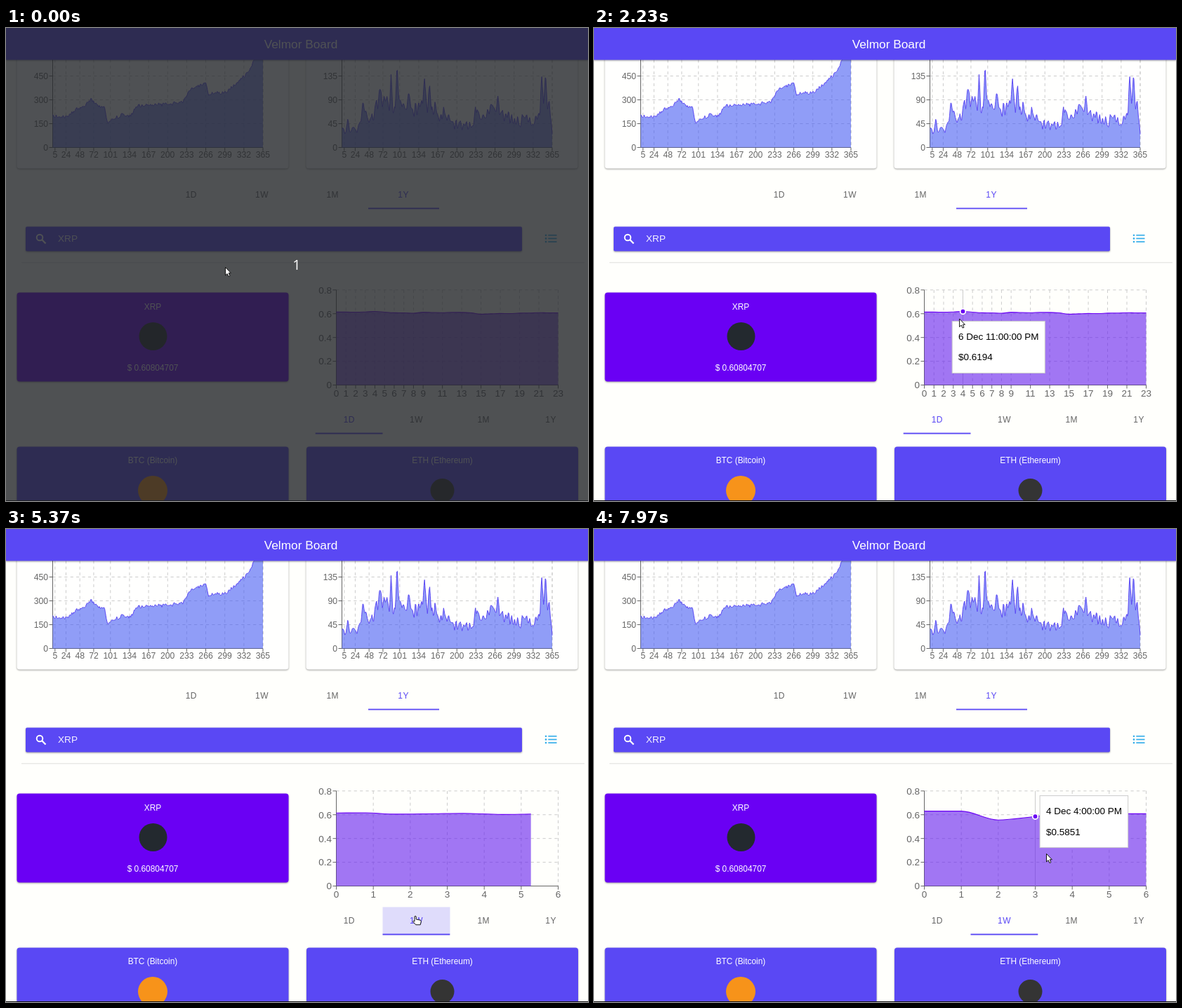
Recreate the animation shown at these times as an HTML page. Size 829 px wide and 675 px high, loop 8000 ms.

```html
<!DOCTYPE html>
<html lang="en">
<head>
<meta charset="utf-8">
<title>Velmor Board</title>
<style>
  html, body { margin: 0; width: 100%; height: 100%; overflow: hidden; background: #fffffc; }
  svg { display: block; font-family: "Liberation Sans", Arial, sans-serif; }
  .shadow { filter: drop-shadow(0 1px 1px rgba(0,0,0,.38)); }
  .tab { font-size: 12px; letter-spacing: .4px; }
</style>
</head>
<body>
<svg id="stage" width="829" height="675" viewBox="0 0 829 675">
  <defs><clipPath id="tabClip"><rect x="536.5" y="539.5" width="96" height="40"/></clipPath></defs>
</svg>
<script>
const LOOP = 8000, BLUE = '#5a48f4', VIOLET = '#6a00f4', GREY = '#666', DASH = '4.2 4.2';
const stage = document.getElementById('stage');

function set(node, attrs) {
  for (const k in attrs) node.setAttribute(k, attrs[k]);
  return node;
}
function add(tag, attrs, parent = stage) {
  return parent.appendChild(set(document.createElementNS('http://www.w3.org/2000/svg', tag), attrs));
}
function text(str, x, y, size, fill, anchor = 'middle', parent = stage) {
  const node = add('text', { x, y, 'font-size': size, fill, 'text-anchor': anchor }, parent);
  node.textContent = str;
  return node;
}
const line = (x1, y1, x2, y2, stroke, parent, extra) => add('line', { x1, y1, x2, y2, stroke, ...extra }, parent);
const box = (x, y, width, height, fill, rx = 4, cls = 'shadow') =>
  add('rect', { x, y, width, height, fill, rx, class: cls });
const show = (node, on) => node.setAttribute('visibility', on ? 'visible' : 'hidden');
const clamp = v => Math.max(0, Math.min(1, v));
const mix = (a, b, k) => a + (b - a) * k;
const pairs = list => list.trim().split(/\s+/).map(p => p.split(',').map(Number));
const range = n => [...Array(n).keys()];

// CSS "ease" curve
function ease(x) {
  let lo = 0, hi = 1, u = .5;
  for (let i = 0; i < 20; i++) {
    u = (lo + hi) / 2;
    const bx = .75 * u * (1 - u) + u ** 3;
    if (bx < clamp(x)) lo = u; else hi = u;
  }
  return .3 * u * (1 - u) ** 2 + 3 * u * u * (1 - u) + u ** 3;
}
function along(points, at) {
  const i = points.findIndex(p => p[0] > at);
  if (i === 0) return points[0].slice(1);
  if (i < 0) return points[points.length - 1].slice(1);
  const a = points[i - 1], b = points[i], k = (at - a[0]) / (b[0] - a[0]);
  return a.slice(1).map((v, j) => mix(v, b[j + 1], k));
}

// Axes, ticks and dashed grid
function axes(o) {
  const g = add('g', {}), grid = add('g', { stroke: '#ccc', 'stroke-dasharray': DASH }, g);
  const dashed = (...c) => line(...c, '#ccc', grid);
  for (const [label, y] of o.rows) {
    dashed(o.left, y, o.right, y);
    line(o.left - 5, y, o.left, y, GREY, g);
    text(label, o.left - 6.5, y + o.size * .36, o.size, GREY, 'end', g);
  }
  for (const [label, x] of o.cols) {
    dashed(x, o.top, x, o.bottom);
    line(x, o.bottom, x, o.bottom + 5, GREY, g);
    text(label, x, o.bottom + o.size * 1.22, o.size, GREY, 'middle', g);
  }
  dashed(o.right, o.top, o.right, o.bottom);
  line(o.left, o.top, o.left, o.bottom, GREY, g);
  line(o.left, o.bottom, o.right, o.bottom, GREY, g);
  return g;
}

// Year charts: a trend, seeded jitter every few days, and sharp peaks
function yearChart({ left, step, trend, jitter, every, peaks = [], seed }) {
  const days = [5, 24, 48, 72, 101, 134, 167, 200, 233, 266, 299, 332, 365];
  const xOf = day => left + (day - 1) * .8228;
  box(left - 51, 20, 387, 180.5, '#fffffe');
  axes({ left, right: left + 299.5, top: 20, bottom: 170.5, size: 12.2,
    rows: range(4).map(i => [i * step, 170.5 - i * 34]), cols: days.map(d => [d, xOf(d)]) });
  const random = () => (seed = (seed * 16807) % 2147483647) / 2147483647 - .5;
  const noise = range(366).map(i => [i * every, random()]);
  const d = range(365).map(i => {
    const x = i * .8228, base = along(trend, x)[0];
    let y = base + along(noise, i)[0] * jitter(base);
    for (const [px, py] of peaks) y = Math.min(y, mix(py, y, clamp(Math.abs(x - px) / 2.6)));
    return `${i ? 'L' : 'M'}${(left + x).toFixed(2)} ${y.toFixed(1)}`;
  }).join('');
  add('path', { d: `${d}V170.5H${left}Z`, fill: '#465cf3', 'fill-opacity': .6 });
  add('path', { d, fill: 'none', stroke: BLUE, 'stroke-width': 1 });
}
yearChart({ left: 66.5, step: 150, seed: 17, every: 1.5, jitter: () => 5,
  trend: pairs(`0,126 22,127 32,117 46,110 55,102 64,112 74,114 78,135 98,124 110,125 122,111 164,109
    186,105 196,88 218,79 222,94 246,92 264,77 279,63 287,46 300,20`) });
yearChart({ left: 478.5, step: 45, seed: 99, every: 2.6, jitter: base => (172 - base) * .52,
  trend: pairs(`0,149 18,145 26,138 34,119 42,128 54,104 68,112 90,114 110,112 128,110 140,124 155,134 180,139
    195,124 215,118 232,124 250,134 272,132 281,118 295,112 298,130 300,160`),
  peaks: pairs('8.5,128 30,104 54,87 70,65 78.6,49 95,91 117.5,70 125,82 145,111 190,112 222,96 284.5,66 290,64') });

// Header and static page parts
box(0, -6, 829, 51.5, BLUE, 0);
text('Velmor Board', 420, 28.5, 17.3, '#fff');
const RANGES = ['1D', '1W', '1M', '1Y'];
RANGES.forEach((name, i) =>
  set(text(name, 263.7 + i * 100.8, 242, 12, i === 3 ? BLUE : GREY), { class: 'tab' }));
box(516, 256.6, 101, 1.8, BLUE, 0, '');

box(28, 283.5, 707, 35, BLUE, 2);
add('circle', { cx: 48, cy: 299, r: 4.3, fill: 'none', stroke: '#fff', 'stroke-width': 1.9 });
line(51.3, 302.3, 56.5, 307.5, '#fff', stage, { 'stroke-width': 2.3 });
text('XRP', 74, 305, 13.6, '#f4f2ff', 'start');
for (const y of [295.7, 300.4, 305.1]) {
  add('circle', { cx: 769, cy: y, r: 1.3, fill: '#36aeea' });
  line(772.3, y, 784.5, y, '#36aeea', stage, { 'stroke-width': 1.7 });
}
line(22, 334.8, 824, 334.8, '#dededc');

box(15.5, 377.5, 387, 127, VIOLET);
text('XRP', 209, 402, 11.9, '#fff');
add('circle', { cx: 209.5, cy: 440, r: 20, fill: '#23292f' });
text('$ 0.60804707', 209, 489, 11.9, '#fff');

box(15.5, 597.5, 387, 100, BLUE);
box(428, 597.5, 387, 100, BLUE);
text('BTC (Bitcoin)', 209, 621, 11.9, '#fff');
text('ETH (Ethereum)', 621.5, 621, 11.9, '#fff');
add('circle', { cx: 209, cy: 660, r: 21, fill: '#f7931a' });
add('circle', { cx: 621.5, cy: 660, r: 17, fill: '#343434' });

// Price chart
const L = 470.5, R = 786.5, T = 373.8, B = 509.5;
const yOf = price => B - price * 169.6;
const hourly = [.614, .614, .613, .615, .6194, .613, .608, .607, .604, .6125, .61, .609,
  .612, .611, .607, .596, .599, .602, .601, .605, .606, .609, .607, .607];
const daily = [.63, .63, .5559, .5851, .622, .608, .608];
const spread = prices => prices.map((p, i) => [mix(L, R, i / (prices.length - 1)), yOf(p)]);
const dayPoints = spread(hourly), weekPoints = spread(daily);
const priceAxes = (points, ticks) => axes({ left: L, right: R, top: T, bottom: B, size: 13.5,
  rows: ['0', '0.2', '0.4', '0.6', '0.8'].map((s, i) => [s, B - i * 33.92]), cols: ticks.map(i => [i, points[i][0]]) });
const dayAxes = priceAxes(dayPoints, range(24).filter(i => i < 9 || i % 2));
const weekAxes = priceAxes(weekPoints, range(7));
const guide = line(0, T, 0, B, '#ccc');
const area = add('path', { fill: '#631bee', 'fill-opacity': .6 });
const curve = add('path', { fill: 'none', stroke: VIOLET, 'stroke-width': 1.1 });
const dot = add('circle', { r: 3.8, fill: VIOLET, stroke: '#fff', 'stroke-width': 1.8 });

// Monotone cubic through the points
function smooth(p) {
  const s = p.map((q, i) => i ? (q[1] - p[i - 1][1]) / (q[0] - p[i - 1][0]) : 0);
  const m = p.map((_, i) => {
    if (i === 0) return s[1];
    if (i === p.length - 1) return s[i];
    return s[i] * s[i + 1] <= 0 ? 0 : 2 * s[i] * s[i + 1] / (s[i] + s[i + 1]);
  });
  return p.map(([x, y], i) => {
    if (!i) return `M${x} ${y}`;
    const [px, py] = p[i - 1], h = (x - px) / 3;
    return `C${px + h} ${py + m[i - 1] * h} ${x - h} ${y - m[i] * h} ${x} ${y}`;
  }).join('');
}

// Range tabs
const CLICK = 4830, SWITCH = 5260, MORPH = 1500;
const ripple = add('circle', { cx: 583, cy: 558, fill: BLUE, 'clip-path': 'url(#tabClip)' });
const tabs = RANGES.map((name, i) => set(text(name, 488.7 + i * 95.8, 563, 12, GREY), { class: 'tab' }));
const marker = box(440.7, 577.6, 95.8, 1.9, BLUE, 0, '');

// Tooltip
const tip = add('g', {});
const tipBox = add('rect', { x: .5, y: .5, height: 74, fill: '#fff', stroke: '#ccc' }, tip);
const tipTime = text('', 9.3, 27.3, 13.5, '#000', 'start', tip);
const tipPrice = text('', 9.3, 56.5, 13.5, '#000', 'start', tip);

line(0, 674.5, 829, 674.5, '#111');

// Countdown veil
const veil = add('g', {});
add('rect', { width: 829, height: 675, fill: 'rgb(36,38,42)', 'fill-opacity': .8 }, veil);
const count = set(text('1', 414, 345, 20, '#fff'), { 'font-family': '"Open Sans", sans-serif' });

// Pointers
const ink = { fill: '#fff', stroke: '#111', 'stroke-width': 1, 'stroke-linejoin': 'round' };
const arrow = add('path', { ...ink, d: 'M.5.5V12L3.1 9.6L5 13.6L6.9 12.7L5.2 8.8H8.4Z' });
const hand = add('path', { ...ink, d: 'M-1 1q1-1.4 2.2 0v4l6 1.2q1.4.5 1 2.6l-1 4h-6.5l-4-4.6q.2-1.8 2.3-.2z' });

// time, x, y
const route = pairs(`200,312,341 630,314,341 1000,316,342 1430,440,392 1750,476,405 2000,490,406 2230,520,414.5
  2950,590,421 3300,596,424 4250,598,424 4350,597,505 4550,594,512 4700,583,552 6250,583,552 6500,573,513.5
  7200,557,470 7300,557,468 7450,602,466 7600,630,464 7970,644,463`);

function hover(t) {
  const [x, y] = along(route, t);
  const points = t < SWITCH ? dayPoints : weekPoints;
  const inside = x >= L && x <= R && y >= T && y <= 515;
  const index = Math.round(clamp((x - L) / (R - L)) * (points.length - 1));
  return { x, y, points, inside, index };
}
// The tooltip trails the pointer; its track is worked out once
const STEP = 10, track = [];
let spot = [480, 400];
for (let t = 0; t < LOOP; t += STEP) {
  const h = hover(t);
  if (h.inside) {
    const goal = [h.points[h.index][0] + 10, h.y + 84 <= B ? h.y + 9.5 : Math.max(T, h.y - 84)];
    spot = spot.map((v, i) => mix(v, goal[i], 1 - Math.exp(-STEP / 200)));
  }
  track.push(spot);
}

function label(index, weekly) {
  if (weekly) return `${index + 1} Dec 4:00:00 PM`;
  const hour = (19 + index) % 24;
  return `${index < 5 ? 6 : 7} Dec ${hour % 12 || 12}:00:00 ${hour < 12 ? 'AM' : 'PM'}`;
}

function draw(t) {
  const weekly = t >= SWITCH, { x, y, points, inside, index } = hover(t);
  show(dayAxes, !weekly);
  show(weekAxes, weekly);

  const k = ease((t - SWITCH) / MORPH);
  const shape = weekly ? weekPoints.map((p, i) => {
    const from = dayPoints[Math.floor(i * 24 / 7)];
    return p.map((v, j) => mix(from[j], v, k));
  }) : dayPoints;
  const d = smooth(shape);
  set(curve, { d });
  set(area, { d: `${d}V${B}H${L}Z` });

  [guide, dot, tip].forEach(node => show(node, inside));
  if (inside) {
    const [px, py] = points[index], [tx, ty] = track[Math.floor(t / STEP)];
    set(guide, { x1: px, x2: px });
    set(dot, { cx: px, cy: py });
    tipTime.textContent = label(index, weekly);
    tipPrice.textContent = '$' + (weekly ? daily : hourly)[index].toFixed(4);
    set(tipBox, { width: tipTime.getComputedTextLength() + 17.5 });
    set(tip, { transform: `translate(${tx.toFixed(1)} ${ty.toFixed(1)})` });
  }

  const clicked = t >= CLICK;
  tabs[0].setAttribute('fill', clicked ? GREY : BLUE);
  tabs[1].setAttribute('fill', clicked ? BLUE : GREY);
  set(marker, { x: 440.7 + 95.8 * ease((t - CLICK) / 300) });
  set(ripple, { r: 62 * ease((t - CLICK) / 450), 'fill-opacity': .3 * (1 - clamp((t - 5230) / 390)) });

  show(veil, t < 200);
  veil.setAttribute('opacity', t < 70 ? 1 : .5);
  show(count, t < 70);

  const onTab = y > 539;
  show(arrow, !onTab);
  show(hand, onTab);
  set(onTab ? hand : arrow, { transform: `translate(${x.toFixed(1)} ${y.toFixed(1)})` });
}

const start = performance.now();
function frame() {
  draw((performance.now() - start) % LOOP);
  requestAnimationFrame(frame);
}
frame();
</script>
</body>
</html>
```
